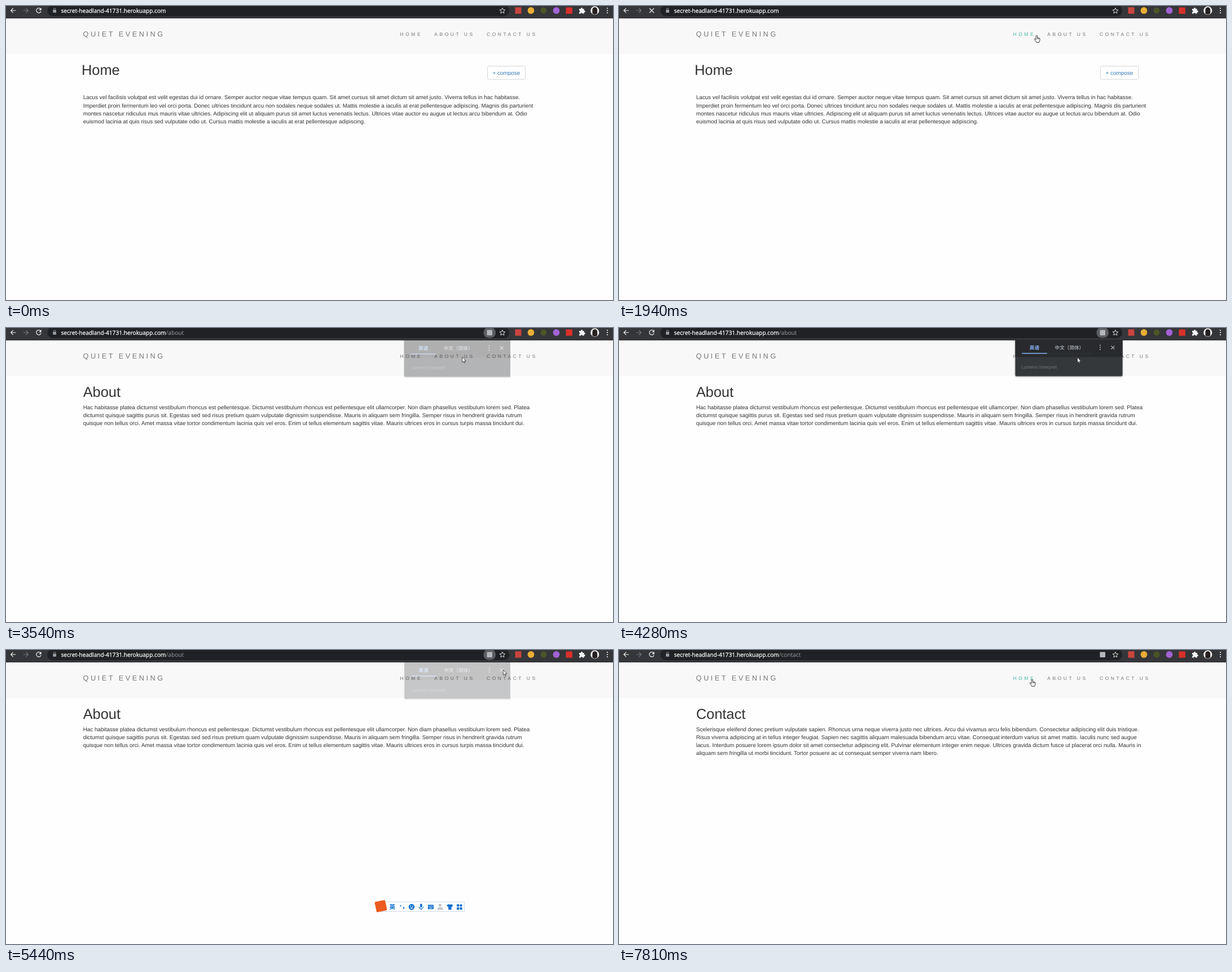
Write an HTML page that moves like this. It is 1076 by 521 pixels and loops after 8 s.

```html
<!DOCTYPE html>
<html lang="en">
<head>
<meta charset="utf-8">
<title>Blog pages</title>
<style>
  html, body { margin: 0; width: 100%; height: 100%; overflow: hidden; background: #fefefe; }
  svg { display: block; width: 1076px; height: 521px; text-rendering: geometricPrecision; }
  .page { font: 9.88px Arial, "Liberation Sans", sans-serif; fill: #333; }
  .page .title { font-size: 25.4px; }
  .nav { font: 8.47px Arial, "Liberation Sans", sans-serif; letter-spacing: 3.53px; fill: #777; }
  .nav .brand { font-size: 12.7px; }
  .nav .hot { fill: #45b9a6; }
  .url { font: 10.16px "Open Sans", "Noto Sans", sans-serif; fill: #fff; }
  .host { stroke: #fff; stroke-width: .25; }
  .cjk { font-family: "Noto Sans CJK SC", "Noto Sans CJK", sans-serif; font-weight: 700; }
  .line { fill: none; stroke: #f1f3f4; stroke-width: 1.2; }
</style>
</head>
<body>
<svg viewBox="0 0 1076 521">
  <defs>
    <clipPath id="edge"><rect x="690" y="21" width="204" height="80"/></clipPath>
    <filter id="shade" x="-10%" y="-10%" width="120%" height="130%">
      <feDropShadow dx="0" dy="1" stdDeviation="1.3" flood-opacity=".5"/>
    </filter>
  </defs>
  <rect width="1076" height="521" fill="#fefefe"/>
  <rect y="21" width="1076" height="64" fill="#f8f8f8"/>

  <g class="nav">
    <text class="brand" x="136.5" y="54">QUIET EVENING</text>
    <text class="link" x="698.6" y="53">HOME</text>
    <text class="link" x="759.3" y="53">ABOUT US</text>
    <text class="link" x="852" y="53">CONTACT US</text>
  </g>

  <g class="page" id="page"></g>
  <g id="compose">
    <rect x="853.5" y="106.5" width="67" height="23.6" rx="2.8" fill="#fff" stroke="#ccc" stroke-width=".8"/>
    <text class="page" x="862.6" y="121.5" style="fill:#337ab7">+ compose</text>
  </g>

  <!-- browser bar -->
  <rect width="1076" height="22" fill="#35363a"/>
  <rect x="73.5" y="-1.5" width="818.5" height="19.5" rx="9.7" fill="#202124"/>
  <path class="line" d="M17.3 8H8.6M12.7 3.9L8.6 8l4.1 4.1"/>
  <path class="line" d="M30.7 8h8.7M35.3 3.9L39.4 8l-4.1 4.1" style="stroke:#77787b"/>
  <g id="reload">
    <path class="line" d="M61.2 5.1A4.2 4.2 0 1 0 62 9.3"/>
    <path d="M62.6 3v4.4h-4.4z" fill="#f1f3f4"/>
  </g>
  <path id="stop" class="line" d="M54 4l8 8M62 4l-8 8"/>
  <rect x="83.2" y="6.8" width="5.8" height="5" rx=".6" fill="#9aa0a6"/>
  <path d="M84.4 7V5.6a1.7 1.7 0 0 1 3.4 0V7" fill="none" stroke="#9aa0a6"/>
  <text class="url" x="97.4" y="11.8"><tspan class="host">secret-headland-41731.herokuapp.com</tspan><tspan id="path" fill="#9aa0a6"></tspan></text>
  <rect id="pill" x="846.5" y="-1" width="21.5" height="18.4" rx="8.5" fill="#5b5d61"/>
  <rect id="lang" x="852.5" y="3.5" width="9.5" height="9.5" rx="1" fill="#b4b7bb"/>
  <path class="line" d="M879.9 3.4l1.4 3.3 3.5.3-2.7 2.3.8 3.5-3-1.9-3 1.9.8-3.5-2.7-2.3 3.5-.3z" style="stroke-width:.9"/>
  <rect x="902.5" y="2.3" width="11" height="11.4" fill="#c9453f"/>
  <circle cx="930.5" cy="8" r="5.9" fill="#e9ae35"/>
  <circle cx="953" cy="8" r="5.4" fill="#4c5526"/>
  <circle cx="975.5" cy="8" r="5.9" fill="#a262d4"/>
  <rect x="992.5" y="2.4" width="11.4" height="11.4" rx="1" fill="#d9302b"/>
  <path d="M1016 5h3a1.6 1.6 0 1 1 3.1 0h2.6v3a1.6 1.6 0 1 1 0 3.1v2.4h-2.8a1.5 1.5 0 1 0-3 0H1016v-2.8a1.5 1.5 0 1 0 0-3z" fill="#f1f3f4"/>
  <circle cx="1043.8" cy="8" r="7.6" fill="#f4f2f2"/>
  <path d="M1039.4 13.2V7a4.4 4.8 0 0 1 8.8 0v6.2a7 7 0 0 1-8.8 0z" fill="#251f20"/>
  <g fill="#f1f3f4"><circle cx="1066" cy="4" r="1.1"/><circle cx="1066" cy="8" r="1.1"/><circle cx="1066" cy="12" r="1.1"/></g>

  <!-- language popup -->
  <g clip-path="url(#edge)">
    <g id="popup">
      <rect x="702.5" y="17" width="190" height="68.3" rx="2" fill="#36373a" filter="url(#shade)"/>
      <rect x="702.5" y="17" width="190" height="34.5" fill="#292a2d"/>
      <path d="M759 45.2h79" stroke="#36383b" stroke-width=".8"/>
      <path d="M714 45h45" stroke="#8ab4f8" stroke-width="1.4"/>
      <text class="cjk" x="727.8" y="38" font-size="8.6" fill="#8ab4f8">英语</text>
      <text class="cjk" x="772.6" y="38" font-size="8.6" fill="#9aa0a6">中文（简体）</text>
      <g fill="#bdc1c6"><circle cx="853" cy="30.7" r="1"/><circle cx="853" cy="34.5" r="1"/><circle cx="853" cy="38.3" r="1"/></g>
      <path d="M872.4 31.6l6 6M878.4 31.6l-6 6" stroke="#bdc1c6" stroke-width="1.1"/>
      <text x="713.6" y="72.4" font-family="Roboto, sans-serif" font-size="8.3" fill="#707276">Lumevo Interpret</text>
    </g>
  </g>

  <!-- input method bar -->
  <g id="ime" fill="#0b6fd0">
    <rect x="664" y="446.3" width="148.3" height="17" fill="#fff" stroke="#c3d5ea" stroke-width=".9"/>
    <rect x="655" y="444.6" width="19" height="18.6" rx="2" fill="#ec5a1f" transform="rotate(-12 664.5 454)"/>
    <text class="cjk" x="679.6" y="459" font-size="10.6">英</text>
    <circle cx="699.6" cy="453.4" r="1.2"/>
    <path d="M704 455.6h2.2v1.8l-1.4 2h-.8l.6-1.8h-.6z"/>
    <circle cx="719" cy="455.2" r="5.2"/>
    <circle cx="717.2" cy="453.7" r=".9" fill="#fff"/><circle cx="720.8" cy="453.7" r=".9" fill="#fff"/>
    <path d="M716 456.4a3.1 2.6 0 0 0 6 0z" fill="#fff"/>
    <rect x="734.1" y="449.6" width="3.6" height="6.8" rx="1.8"/>
    <path d="M732 454.6a3.9 3.9 0 0 0 7.8 0M735.9 458.4v2.6" fill="none" stroke="#0b6fd0" stroke-width="1.1"/>
    <rect x="747.9" y="451.4" width="10" height="7.8" rx=".8"/>
    <path d="M749.3 453.6h7.4M749.3 455.5h7.4" stroke="#fff" stroke-width="1" stroke-dasharray="1.1 .9"/>
    <path d="M750.4 457.6h5" stroke="#fff" stroke-width=".9"/>
    <g fill="#c4c8ce"><circle cx="769.4" cy="452.2" r="2.6"/><path d="M765 460.4v-2.6q0-2 2.4-2h4q2.8 0 2.8 2v2.6z"/></g>
    <path d="M784.6 450.2q2.3 2 4.6 0l3.2 2-1.6 3-1.2-.6v5.6h-5.4v-5.6l-1.2.6-1.6-3z"/>
    <rect x="799" y="450.5" width="4.3" height="4.3" rx="1"/><circle cx="806.4" cy="452.7" r="2.2"/>
    <rect x="799" y="456" width="4.3" height="4.3" rx="1"/><rect x="804.4" y="456" width="4.3" height="4.3" rx="1"/>
  </g>

  <g id="cursor">
    <path id="arrow" d="M0 0V9.4L2.2 7.5 3.6 10.6 5 10 3.7 7H6.6Z" fill="#fff" stroke="#111" stroke-width=".7"/>
    <g id="hand" fill="#fff" stroke="#222" stroke-width=".9" stroke-linejoin="round">
      <path d="M-1.2 1.2Q0-.5 1.2 1.2V5l1.4.2 1.5.4 1.4.6Q5.8 6.8 5.7 8L5.2 10.4 4.4 12.9H-.6L-1.4 11-4 7.9Q-4.4 6.4-3 6.5L-1.2 8Z"/>
      <path d="M1.2 5v2.2M2.7 5.3v2M4.2 5.8v1.7" stroke-width=".7"/>
    </g>
  </g>
</svg>

<script>
const LOOP = 8000;
const el = id => document.getElementById(id);
const links = [...document.querySelectorAll('.link')];

const pages = [
  { title: 'Home', x: 134, y: 165.4, lines: [
    'Lacus vel facilisis volutpat est velit egestas dui id ornare. Semper auctor neque vitae tempus quam. Sit amet cursus sit amet dictum sit amet justo. Viverra tellus in hac habitasse.',
    'Imperdiet proin fermentum leo vel orci porta. Donec ultrices tincidunt arcu non sodales neque sodales ut. Mattis molestie a iaculis at erat pellentesque adipiscing. Magnis dis parturient',
    'montes nascetur ridiculus mus mauris vitae ultricies. Adipiscing elit ut aliquam purus sit amet luctus venenatis lectus. Ultrices vitae auctor eu augue ut lectus arcu bibendum at. Odio',
    'euismod lacinia at quis risus sed vulputate odio ut. Cursus mattis molestie a iaculis at erat pellentesque adipiscing.'] },
  { title: 'About', x: 136.7, y: 144, lines: [
    'Hac habitasse platea dictumst vestibulum rhoncus est pellentesque. Dictumst vestibulum rhoncus est pellentesque elit ullamcorper. Non diam phasellus vestibulum lorem sed. Platea',
    'dictumst quisque sagittis purus sit. Egestas sed sed risus pretium quam vulputate dignissim suspendisse. Mauris in aliquam sem fringilla. Semper risus in hendrerit gravida rutrum',
    'quisque non tellus orci. Amet massa vitae tortor condimentum lacinia quis vel eros. Enim ut tellus elementum sagittis vitae. Mauris ultrices eros in cursus turpis massa tincidunt dui.'] },
  { title: 'Contact', x: 136.7, y: 144, lines: [
    'Scelerisque eleifend donec pretium vulputate sapien. Rhoncus urna neque viverra justo nec ultrices. Arcu dui vivamus arcu felis bibendum. Consectetur adipiscing elit duis tristique.',
    'Risus viverra adipiscing at in tellus integer feugiat. Sapien nec sagittis aliquam malesuada bibendum arcu vitae. Consequat interdum varius sit amet mattis. Iaculis nunc sed augue',
    'lacus. Interdum posuere lorem ipsum dolor sit amet consectetur adipiscing elit. Pulvinar elementum integer enim neque. Ultrices gravida dictum fusce ut placerat orci nulla. Mauris in',
    'aliquam sem fringilla ut morbi tincidunt. Tortor posuere ac ut consequat semper viverra nam libero.'] }
];

el('page').innerHTML = pages.map(p => `<g><text class="title" x="${p.x}" y="121.8">${p.title}</text>` +
  p.lines.map((s, i) => `<text x="136.7" y="${p.y + i * 14.1}">${s}</text>`).join('') + '</g>').join('');
const sheets = [...el('page').children];

// Pointer strokes: start, end, one point per step
const moves = [
  [70, 340, [[1031, 512], [962, 385], [852, 222], [764, 118], [728, 88]]],
  [540, 810, [[727, 83], [726, 74], [725, 64], [724, 56], [724, 52]]],
  [1940, 2080, [[740.4, 51.5], [779, 52], [808.7, 51.5]]],
  [4280, 4960, [[812.5, 52], [838, 57], [884, 64], [940, 67], [983, 66],
    [996, 61], [975, 51], [930, 42], [892, 36], [881.3, 35]]],
  [5720, 5930, [[882, 38], [884, 42], [886, 46], [887.5, 48.5]]],
  [7270, 7810, [[880, 56], [862, 61], [838, 62], [810, 60], [784, 57],
    [762, 54], [745, 52.5], [735, 52], [732.4, 51.5]]]
];

const within = (t, ...spans) => spans.some(([a, b]) => t >= a && t < b);
const show = (id, on) => el(id).setAttribute('visibility', on ? 'visible' : 'hidden');
// Index of the current step among n between a and b
const step = (t, a, b, n) => Math.max(-1, Math.min(n - 1, Math.floor((t - a) / (b - a) * (n - 1) + .03)));

function pointer(t) {
  const move = moves.filter(m => t >= m[0]).pop();
  return move && move[2][step(t, move[0], move[1], move[2].length)];
}

function popupAlpha(t) {
  if (t < 3540 || t >= 5580) return 0;
  if (t < 3680) return [.35, .75, 1][step(t, 3540, 3680, 3)];
  return t < 5230 ? 1 : [1, .8, .5, .25, .1, 0][step(t, 5230, 5580, 6)];
}

function draw(t) {
  const page = t < 3470 ? 0 : t < 6790 ? 1 : 2;
  sheets.forEach((g, i) => g.setAttribute('visibility', i === page ? 'visible' : 'hidden'));
  show('compose', page === 0);
  el('path').textContent = t < 3200 ? '' : t < 6530 ? '/about' : '/contact';

  const busy = within(t, [1010, 2670], [2940, 3470], [6130, 6790]);
  show('stop', busy);
  show('reload', !busy);
  show('lang', within(t, [3540, 6530], [6790, LOOP]));
  show('ime', within(t, [70, 1140], [5300, 5580]));
  el('pill').setAttribute('opacity', t < 3540 ? 0 : t < 5720 ? 1 : Math.max(0, .75 - step(t, 5720, 5930, 4) * .25));

  const alpha = popupAlpha(t), gone = 1 - alpha;
  el('popup').setAttribute('opacity', alpha);
  el('popup').setAttribute('transform', `translate(${gone * 5.1} ${gone * 1.7})`);

  // A fresh page ignores the resting pointer until it moves
  const p = pointer(t);
  const idle = within(t, [2670, 2740], [3470, 5580], [6790, 7270]);
  const over = !p || idle || p[1] > 74 || p[1] < 32 || p[0] < 688 ? -1 : p[0] < 748.7 ? 0 : p[0] < 841.4 ? 1 : 2;
  links.forEach((a, i) => a.classList.toggle('hot', i === over));
  show('arrow', p && over < 0);
  show('hand', p && over >= 0);
  if (p) el('cursor').setAttribute('transform', `translate(${p})`);
}

const start = performance.now();
function tick() {
  draw((performance.now() - start) % LOOP);
  requestAnimationFrame(tick);
}
tick();
</script>
</body>
</html>
```
